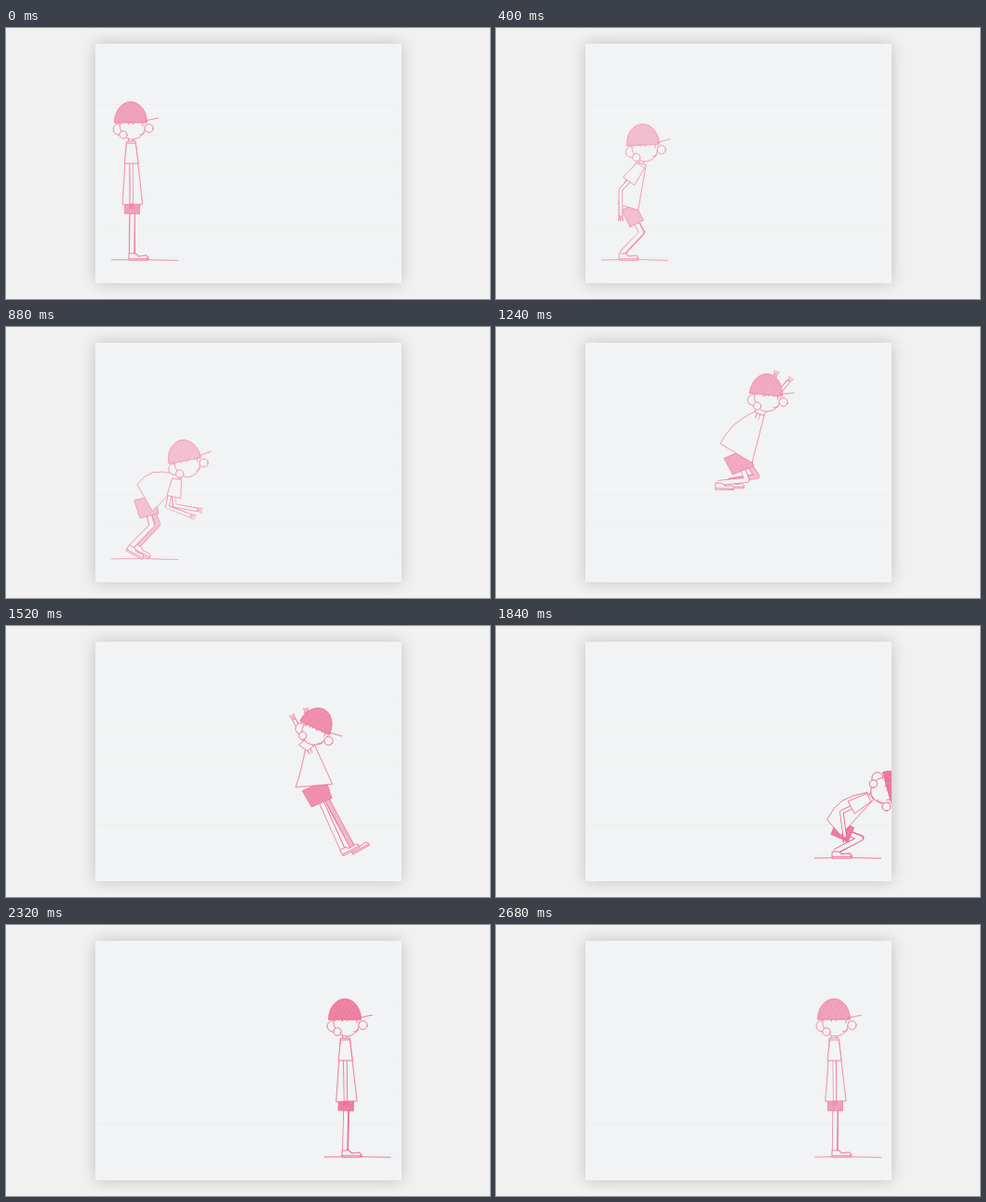
An HTML page with a canvas for the animation above (2800 ms loop, 520x292 px).

```html
<!DOCTYPE html>
<html lang="en">
<head>
<meta charset="utf-8">
<title>Pencil jump</title>
<style>
  html, body { margin: 0; width: 100%; height: 100%; overflow: hidden; background: #f1f1f1; }
  canvas { display: block; width: 520px; height: 292px; }
</style>
</head>
<body>
<canvas id="stage" width="520" height="292"></canvas>
<script>
const ctx = document.getElementById('stage').getContext('2d');
const LOOP = 2800, DRAWINGS = 28, GROUND = 243, START = 135, JUMP = 229;
const SHEET = [96, 17, 329, 258], PAPER = '#f1f3f4';
const { PI, sin, cos, hypot, min, max, sqrt } = Math;
let seed, pressure, ink;

// Key poses: head x, y, hem x, y, hand x, y, head tilt. The rest of the body follows from them.
const stand = [134, 101, 136, 190, 135, 190, 0];
const dip = [158, 125, 142, 193, 134, 203, -.05];
const moved = (pose, d) => pose.map((v, i) => i < 6 && i % 2 === 0 ? v + d : v);
const KEYS = [
  [0, stand],
  [4, dip],
  [7, [180, 165, 138, 212, 115, 180, .2]],
  [9, [192, 143, 149, 184, 206, 197, -.18]],
  [11, [236, 88, 190, 155, 266, 80, -.5]],
  [13, [290, 72, 258, 136, 300, 52, .1]],
  [16, [332, 109, 331, 172, 309, 100, .45]],
  [19, [421, 174, 363, 217, 375, 228, 1.3]],
  [21, moved(dip, JUMP)],
  [24, moved(stand, JUMP + 1)],
  [DRAWINGS, moved(stand, JUMP)]
];

// Catmull-Rom curve through the key poses.
function poseAt(n) {
  const last = KEYS.length - 1;
  const i = min(last - 1, KEYS.findLastIndex(([at]) => at <= n));
  const key = j => KEYS[max(0, min(last, j))];
  const u = (n - key(i)[0]) / (key(i + 1)[0] - key(i)[0]);
  const [p, q, r, s] = [-1, 0, 1, 2].map(d => key(i + d)[1]);
  return q.map((b, c) =>
    b + u / 2 * (r[c] - p[c] + u * (2 * p[c] - 5 * b + 4 * r[c] - s[c] + u * (3 * (b - r[c]) + s[c] - p[c]))));
}

// Feet stay planted, then fly in one eased arc.
function feetAt(n) {
  const f = max(0, min(1, (n - 10) / 6.4));
  const tilt = n > 8 && f < 1 ? .5 * cos(PI * f) : 0;
  return {
    tilt,
    ankle: [START + JUMP * f * f * (3 - 2 * f), GROUND - 75 * sin(PI * f) ** 2 - 14 * max(0, sin(tilt))]
  };
}

function random() {
  const x = sin(++seed * 12.9898) * 43758.5453;
  return x - Math.floor(x);
}
const wobble = () => (random() - .5) * 1.1;

const add = (a, b, k = 1) => [a[0] + b[0] * k, a[1] + b[1] * k];
const unit = (a, b) => {
  const d = hypot(b[0] - a[0], b[1] - a[1]) || 1;
  return [(b[0] - a[0]) / d, (b[1] - a[1]) / d];
};
const distance = (a, b) => hypot(b[0] - a[0], b[1] - a[1]);
const toward = (a, b, length) => add(a, unit(a, b), length);
const normal = (a, b) => {
  const [x, y] = unit(a, b);
  return [y, -x];
};

// Middle joint of a limb with two equal bones.
function joint(a, b, bone, side) {
  const half = distance(a, b) / 2;
  return add(toward(a, b, half), normal(a, b), side * sqrt(max(0, bone * bone - half * half)));
}

// A strip from a to b: back, front, front, back.
function taper(a, b, wa, wb) {
  const n = normal(a, b);
  return [add(a, n, -wa), add(a, n, wa), add(b, n, wb), add(b, n, -wb)];
}

function arc(x, y, rx, ry, from, to, steps = 12) {
  return Array.from({ length: steps + 1 }, (_, i) => {
    const a = from + (to - from) * i / steps;
    return [x + rx * cos(a), y + ry * sin(a)];
  });
}

function trace(points, loose = 1) {
  ctx.beginPath();
  for (const [x, y] of points) ctx.lineTo(x + wobble() * loose, y + wobble() * loose);
}

function sketch(points, { closed = false, fill = false, loose = .7 } = {}) {
  if (fill) {
    trace(points, 0);
    ctx.fillStyle = PAPER;
    ctx.fill();
  }
  ctx.strokeStyle = ink;
  ctx.lineWidth = .75;
  ctx.globalAlpha = .65;
  for (let pass = 0; pass < 2; pass++) {
    trace(points, loose);
    if (closed) ctx.closePath();
    ctx.stroke();
  }
  ctx.globalAlpha = 1;
}

function hatch(points) {
  ctx.save();
  trace(points, 0);
  ctx.fillStyle = PAPER;
  ctx.fill();
  ctx.clip();
  ctx.globalAlpha = pressure * .75;
  ctx.fillStyle = ctx.strokeStyle = ink;
  ctx.fill();
  const xs = points.map(p => p[0]), ys = points.map(p => p[1]);
  const top = min(...ys), bottom = max(...ys), lean = (bottom - top) * .6;
  ctx.lineWidth = .8;
  ctx.beginPath();
  for (let x = min(...xs) - lean; x < max(...xs); x += 2) {
    ctx.moveTo(x + lean + wobble(), top);
    ctx.lineTo(x + wobble(), bottom);
  }
  ctx.stroke();
  ctx.restore();
  sketch(points, { closed: true, loose: .4 });
}

const circle = (x, y, r) => sketch(arc(x, y, r, r, 0, 6.6), { fill: true, loose: .4 });

function limb(points, width, inside = PAPER) {
  for (const [w, color] of [[width, ink], [width - 1.6, inside]]) {
    trace(points, .4);
    ctx.lineWidth = w;
    ctx.strokeStyle = color;
    ctx.stroke();
  }
}

function placed([x, y], angle, draw) {
  ctx.save();
  ctx.translate(x, y);
  ctx.rotate(angle);
  draw();
  ctx.restore();
}

function arm(shoulder, hand) {
  const hanging = max(0, unit(shoulder, hand)[1]);
  const elbow = joint(shoulder, hand, 29, -hanging);
  limb([shoulder, elbow, hand], 4.4);
  const [dx, dy] = unit(elbow, hand);
  placed(hand, Math.atan2(dy, dx), () => {
    for (const spread of [-2.5, 0, 2.5]) sketch([[-1, spread / 2], [5, spread]]);
  });
  return elbow;
}

function leg(hip, ankle, tilt, inside) {
  const knee = joint(hip, ankle, 31, 1);
  limb([hip, knee, ankle], 6, inside);
  placed(ankle, tilt, () => {
    sketch([[-3, 0], [4, 0], [7, 3], [15, 2], [17, 4], [17, 7], [-3, 7]], { closed: true, fill: true });
    sketch([[-3, 5.5], [17, 5.5]]);
  });
  return knee;
}

function head(center, tilt) {
  placed(center, tilt, () => {
    circle(-13, 8, 6);
    sketch(arc(2, 3, 14, 16, PI, 0), { fill: true });
    circle(-8, 14, 4.2);
    circle(19.5, 7, 4.6);
    sketch([[13, 1], [13, 5]]);
    sketch(arc(11, 10, 4, 4, 2, .3, 4));
    hatch(arc(0, 1, 17.5, 22.5, PI, 2 * PI));
    sketch([[15, -1], [30, -4]]);
  });
}

function figure(n) {
  const [hx, hy, px, py, gx, gy, tilt] = poseAt(n);
  const { ankle, tilt: footTilt } = feetAt(n);
  const center = [hx, hy], hem = [px, py], hand = [gx, gy];
  const neckWay = add(unit(center, hem), [-sin(tilt), cos(tilt)]);
  const neck = add(center, unit([0, 0], neckWay), 21);
  const torso = distance(neck, hem);
  const hip = toward(neck, hem, min(58, torso));
  const shoulder = toward(neck, hem, 8);

  // The further the arm swings from the body, the more hands, legs and shirt spread.
  const down = unit(neck, hem), reach = unit(shoulder, hand);
  const swing = 1 - down[0] * reach[0] - down[1] * reach[1];
  const apart = [1 + swing * 5, -swing];

  arm(shoulder, add(hand, normal(shoulder, hand), -8 * swing));
  leg(add(hip, apart, .5), add(ankle, apart), footTilt, `color-mix(in srgb, ${ink} 45%, ${PAPER})`);
  const knee = leg(hip, ankle, footTilt);
  hatch(taper(hip, toward(hip, knee, 20), 8 + 3 * swing, 8 + 2 * swing));
  limb([neck, center], 6);

  const [back, front, hemFront, hemBack] = taper(neck, hem, 5, 11 + 4.5 * swing);
  const bulge = -10 * down[0];
  const spine = [.75, .5, .25].map(k =>
    add(add(back, [hemBack[0] - back[0], hemBack[1] - back[1]], k), normal(neck, hem), -bulge * sin(PI * k)));
  sketch([back, front, hemFront, hemBack, ...spine], { closed: true, fill: true });

  const elbow = arm(shoulder, hand);
  sketch(taper(toward(shoulder, neck, 6), toward(shoulder, elbow, 16), 5, 7.5), { closed: true, fill: true });
  head(center, tilt);
}

function sheet() {
  ctx.fillStyle = '#f1f1f1';
  ctx.fillRect(0, 0, 520, 292);
  ctx.save();
  ctx.shadowColor = 'rgba(0, 0, 0, .2)';
  ctx.shadowBlur = 16;
  ctx.fillStyle = PAPER;
  ctx.fillRect(...SHEET);
  ctx.restore();
  ctx.fillStyle = 'rgba(60, 70, 90, .018)';
  for (let y = 82; y < 250; y += 33) ctx.fillRect(SHEET[0], y, SHEET[2], 1);
}

function draw(n) {
  seed = n * 997;
  pressure = .75 - .25 * sin(2 * PI * n / DRAWINGS);
  ink = `hsl(342, 80%, ${87 - 22 * pressure}%)`;
  sheet();
  ctx.save();
  ctx.beginPath();
  ctx.rect(...SHEET);
  ctx.clip();
  ctx.lineJoin = 'round';
  if (n < 10 || n > 16) {
    const x = feetAt(n).ankle[0] - 22;
    sketch([[x, 250], [x + 34, 249.5], [x + 72, 250.5]]);
  }
  figure(n);
  ctx.restore();
}

let shown = -1;
function tick(now) {
  // 96 ms per drawing, on a 40 ms grid
  const n = Math.floor((Math.floor(now % LOOP / 40) + .5) / 2.4);
  if (n !== shown) draw(shown = n);
  requestAnimationFrame(tick);
}
tick(0);
</script>
</body>
</html>
```
